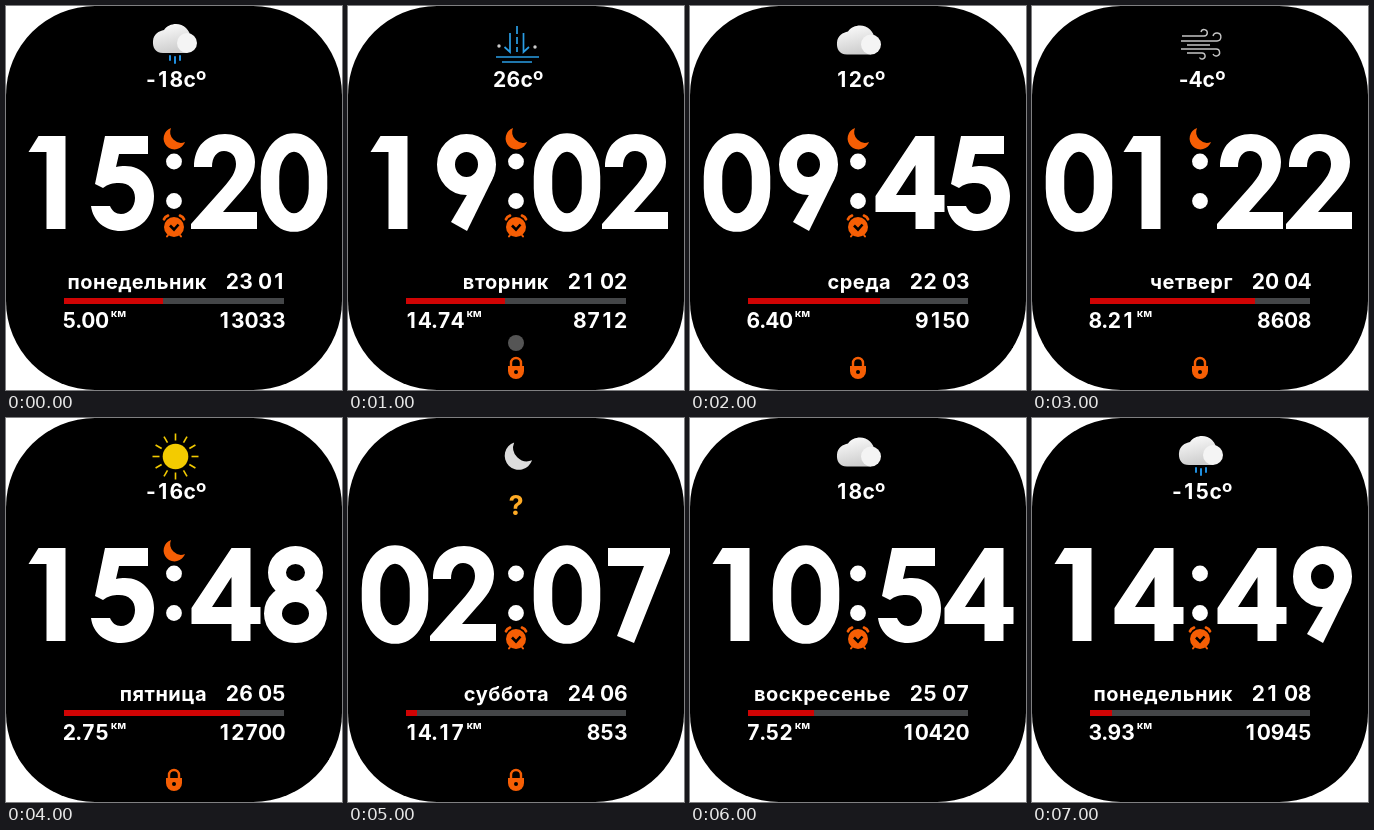
Recreate the animation shown at these times as an HTML page. Size 336 px wide and 384 px high, loop 8000 ms.

```html
<!DOCTYPE html>
<html lang="ru">
<head>
<meta charset="utf-8">
<title>Watch face</title>
<style>
  html, body { margin: 0; width: 100%; height: 100%; overflow: hidden; background: #fff; }
  svg { display: block; width: 100vw; height: 100vh; }
  text { font: 700 20px Inter, "Open Sans", sans-serif; fill: #fff; }
  .num { font-size: 21px; text-anchor: middle; }
  .day { letter-spacing: .5px; text-anchor: end; }
  .unit { font-size: 11px; }
  .ask { font-size: 27px; fill: #ffab25; text-anchor: middle; }
  .face { visibility: hidden; animation: show 8s step-end infinite; animation-delay: calc((var(--i) - 8) * 1s); }
  @keyframes show {
    0% { visibility: visible; }
    12.5%, 100% { visibility: hidden; }
  }
</style>
</head>
<body>
<svg id="stage" viewBox="0 0 336 384">
  <defs>
    <linearGradient id="cloudFill" x1="0" y1="0" x2=".3" y2="1">
      <stop offset="0" stop-color="#fff"/><stop offset="1" stop-color="#cfcfcf"/>
    </linearGradient>

    <rect id="d0" x="9" y="8.5" width="48" height="80" rx="24" ry="34" fill="none" stroke="#fff" stroke-width="18.5"/>
    <path id="d1" d="M8.5 18L18.5 2H45.5V95H26.5V18Z"/>
    <path id="d2" d="M2 33C2 12 15 0 33 0C50 0 63 12 63 28C63 42 55 51 45 62L31 78H65V95H-1V90L31 54C39 45 44 38 44 30C44 22 39 17 32 17C25 17 20 23 20 33Z"/>
    <path id="d4" fill-rule="evenodd" d="M39.5 2H58.5V61H68.5V78H58.5V95H39.5V78H-.5V62ZM39.5 31L20 61H39.5Z"/>
    <path id="d5" d="M16 2H59V20H30L27 33C30 32 33 32 36 32C53 32 65 45 65 62C65 83 51 97 32 97C16 97 4 87 2 72H21C23 77 27 80 32 80C40 80 46 73 46 64C46 55 40 49 30 49C24 49 19 50 14 54L6 50Z"/>
    <path id="d7" d="M5 2H67V7L31 97L14 90L41 20H5Z"/>
    <g id="d8" fill="none" stroke="#fff" stroke-width="18">
      <ellipse cx="34.5" cy="26.5" rx="18.5" ry="17.5"/>
      <ellipse cx="34.5" cy="67.5" rx="22.5" ry="20.5"/>
    </g>
    <g id="d9">
      <ellipse cx="35.5" cy="30.5" rx="20.5" ry="21.5" fill="none" stroke="#fff" stroke-width="18"/>
      <path d="M62 44L36 97L20 88L40 54Z"/>
    </g>

    <path id="crescent" d="M-3-11A11 11 0 1 0 11 3A10.8 10.8 0 0 1-3-11Z"/>

    <g id="alarm" fill="#f65e04" stroke="#f65e04" stroke-linecap="round">
      <circle cx="168" cy="221" r="10" stroke="none"/>
      <path d="M158 213.2Q159 210.5 162 209.6M178 213.2Q177 210.5 174 209.6" fill="none" stroke-width="2.8"/>
      <path d="M162 229L161 230.5M174 229L175 230.5" stroke-width="2"/>
      <path d="M164 219.5L168 223.5L172.5 218.5" fill="none" stroke="#000" stroke-width="2.6" stroke-linecap="butt"/>
    </g>
    <g id="lock" fill="#f65e04">
      <path d="M163 361V357A5 5 0 0 1 173 357V361" fill="none" stroke="#f65e04" stroke-width="2.4"/>
      <path d="M160 360H176V365A8 8 0 0 1 160 365Z"/>
      <circle cx="168" cy="366" r="2" fill="#000"/>
    </g>

    <g id="cloud" fill="url(#cloudFill)">
      <path d="M157 47C149 47 146.5 41 147 35C147.5 28 153 25 158 24C163 17 174 16 180 22C185 27 186 34 184 39L181 47Z"/>
      <circle cx="181" cy="37" r="10" fill="#f4f4f4"/>
    </g>
    <g id="rain">
      <use href="#cloud"/>
      <path d="M164 50V54M169 51V57M174 50V54" stroke="#1f8fe0" stroke-width="2" stroke-linecap="round"/>
    </g>
    <g id="cloudy"><use href="#cloud" y="1.5"/></g>
    <g id="gust" fill="none" stroke="#2a9de4" stroke-width="1.7">
      <path d="M162 27V46L156.5 41M169 20V28M169 31V38M169 41V46M175.5 27V46L181 41M148 51H191M154 56H184"/>
      <g fill="#ccc" stroke="none"><circle cx="151" cy="40" r="1.7"/><circle cx="187" cy="41" r="1.7"/></g>
    </g>
    <g id="wind" fill="none" stroke="#c4c4c4" stroke-width="1.4">
      <path d="M150 30H172A3.2 3.2 0 1 0 169 26M149 35H185A4 4 0 1 0 181 30M155 39H178M149 43H184A3.5 3.5 0 1 1 181 48M155 47H170A3 3 0 1 1 167.5 51.5"/>
    </g>
    <g id="sun" fill="#f3cb00">
      <circle cx="169.5" cy="38.5" r="12.8"/>
      <g id="rays" stroke="#f3cb00" stroke-width="1.6"></g>
    </g>
    <g id="night" fill="#dcdcdc"><use href="#crescent" transform="translate(170 38.5) scale(1.28)"/></g>
  </defs>
  <rect width="336" height="384" rx="89"/>
  <g fill="#fff"><circle cx="168" cy="155.5" r="7.9"/><circle cx="168" cy="195" r="7.9"/></g>
  <rect x="58" y="292" width="220" height="6" fill="#444648"/>
</svg>
<script>
  // goal is the progress bar in percent.
  const states = [
    { time: '1520', day: 'понедельник', date: '23 01', sky: 'rain', temp: '-18cº', km: '5.00', steps: '13033', goal: 45, on: 'moon alarm' },
    { time: '1902', day: 'вторник', date: '21 02', sky: 'gust', temp: '26cº', km: '14.74', steps: '8712', goal: 45, on: 'moon alarm lock link' },
    { time: '0945', day: 'среда', date: '22 03', sky: 'cloudy', temp: '12cº', km: '6.40', steps: '9150', goal: 60, on: 'moon alarm lock' },
    { time: '0122', day: 'четверг', date: '20 04', sky: 'wind', temp: '-4cº', km: '8.21', steps: '8608', goal: 75, on: 'moon lock' },
    { time: '1548', day: 'пятница', date: '26 05', sky: 'sun', temp: '-16cº', km: '2.75', steps: '12700', goal: 80, on: 'moon lock' },
    { time: '0207', day: 'суббота', date: '24 06', sky: 'night', temp: '', km: '14.17', steps: '853', goal: 5, on: 'alarm lock' },
    { time: '1054', day: 'воскресенье', date: '25 07', sky: 'cloudy', temp: '18cº', km: '7.52', steps: '10420', goal: 30, on: 'alarm' },
    { time: '1449', day: 'понедельник', date: '21 08', sky: 'rain', temp: '-15cº', km: '3.93', steps: '10945', goal: 10, on: 'alarm' }
  ];
  const slots = [14, 83, 186, 255];
  const advances = { '.': 5.5, ' ': 5.5, '-': 10, c: 13, 'º': 10 };
  const advance = ch => advances[ch] || 13.6;
  const widthOf = str => [...str].reduce((sum, ch) => sum + advance(ch), 0);

  // Fixed-pitch numerals; align is 0 for left, .5 for centre, 1 for right.
  function num(str, x, y, align) {
    let pen = x - widthOf(str) * align;
    const xs = [...str].map(ch => {
      const mid = pen + advance(ch) / 2;
      pen += advance(ch);
      return mid.toFixed(1);
    });
    return `<text class="num" x="${xs.join(' ')}" y="${y}">${str}</text>`;
  }

  const icons = {
    moon: '<use href="#crescent" x="168" y="133" fill="#f65e04"/>',
    alarm: '<use href="#alarm"/>',
    lock: '<use href="#lock"/>',
    link: '<circle cx="168" cy="337" r="8" fill="#555"/>'
  };

  function face(s, i) {
    const clock = [...s.time].map((d, k) => `<use href="#d${d}" x="${slots[k]}" y="128"/>`).join('');
    const temp = s.temp ? num(s.temp, 170, 81, .5) : '<text class="ask" x="168" y="97">?</text>';
    return `<g class="face" style="--i:${i}">
      <use href="#${s.sky}"/>${temp}
      <g fill="#fff" role="img" aria-label="${s.time.slice(0, 2)}:${s.time.slice(2)}">${clock}</g>
      ${s.on.split(' ').map(name => icons[name]).join('')}
      <text class="day" x="201" y="283">${s.day}</text>
      ${num(s.date, 279.5, 282.5, 1)}
      <rect x="58" y="292" width="${s.goal * 2.2}" height="6" fill="#d00404"/>
      ${num(s.km, 56.5, 322, 0)}
      <text class="unit" x="${58.5 + widthOf(s.km)}" y="311">км</text>
      ${num(s.steps, 279.5, 322, 1)}
    </g>`;
  }

  document.getElementById('rays').innerHTML = Array.from({ length: 12 }, (_, k) =>
    `<path d="M169.5 22.5V15.5" transform="rotate(${k * 30} 169.5 38.5)"/>`).join('');
  document.getElementById('stage').insertAdjacentHTML('beforeend', states.map(face).join(''));
</script>
</body>
</html>
```
